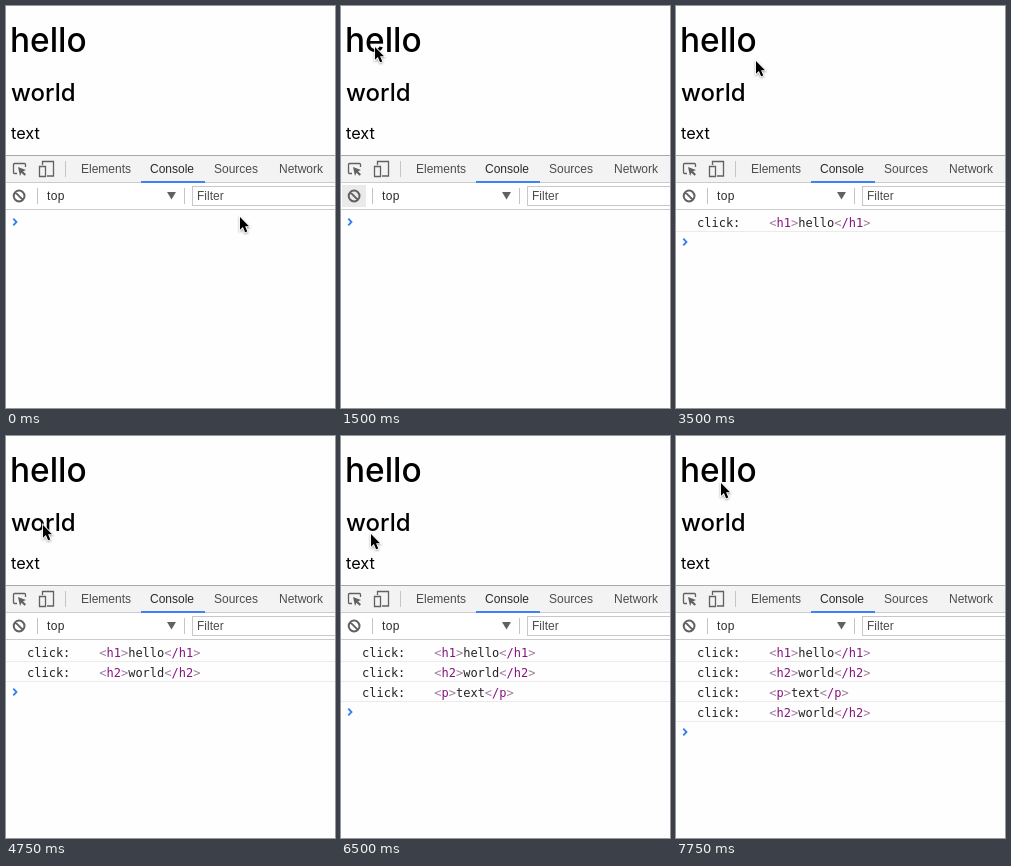
Write an HTML page that moves like this. It is 329 px wide and 402 px high and loops after 8000 ms.

```html
<!DOCTYPE html>
<html lang="en">
<head>
<meta charset="utf-8">
<title>Click logger</title>
<style>
html, body { margin: 0; width: 100%; height: 100%; overflow: hidden; background: #fefefe; }
svg { display: block; }
.page { font-family: Inter, sans-serif; fill: #000; }
.ui { font: 12px "Liberation Sans", Arial, sans-serif; fill: #4c4c4c; }
.ui .dark { fill: #2b2b2b; }
.log { font: 12px "DejaVu Sans Mono", monospace; fill: #222; white-space: pre; }
.bracket { fill: #a07c9c; }
.tag { fill: #881280; }
.icon { fill: none; stroke: #616161; stroke-width: 1.3; }
</style>
</head>
<body>
<svg width="329" height="402" viewBox="0 0 329 402">
  <g class="page">
    <text x="4" y="46" font-size="33.4" font-weight="450">hello</text>
    <text x="5" y="94.5" font-size="24" font-weight="480">world</text>
    <text x="5" y="133" font-size="16.3">text</text>
  </g>

  <rect y="149" width="329" height="28" fill="#f3f3f3"/>
  <rect y="149" width="329" height="1" fill="#a9a9a9"/>
  <rect y="176" width="329" height="1" fill="#ccc"/>
  <rect y="177" width="329" height="26" fill="#fff"/>
  <rect y="203" width="329" height="1" fill="#ccc"/>
  <rect x="135" y="175" width="64" height="2" fill="#3e82f7"/>
  <path d="M59.5 155v16M31.5 182v16M178.5 182v16" stroke="#c4c4c4"/>
  <rect id="hover" x="1" y="179" width="24" height="22" fill="#eaeaea"/>

  <g class="icon">
    <path d="M11 167.5H8.5a1 1 0 0 1-1-1v-8a1 1 0 0 1 1-1h10a1 1 0 0 1 1 1V161"/>
    <path d="M12 161l8 3-3 1.3 3 3-1.5 1.4-3-3L14 170z" fill="#616161" stroke="none"/>
    <path d="M36.5 159v-3.5h11v14.5H41M33.5 160.5h6v10h-6z"/>
    <path d="M9.4 186.4l7.2 7.2M18.5 190a5.4 5.4 0 1 0-10.8 0a5.4 5.4 0 1 0 10.8 0" stroke-width="2"/>
  </g>
  <path d="M161 186h9l-4.5 7.5z" fill="#616161"/>
  <rect x="186.5" y="180.5" width="160" height="19" fill="#fff" stroke="#c8c8c8"/>
  <g class="ui">
    <text x="75" y="167">Elements</text>
    <text x="144" y="167" class="dark">Console</text>
    <text x="208" y="167">Sources</text>
    <text x="273" y="167">Network</text>
    <text x="41" y="194" class="dark" letter-spacing=".4">top</text>
    <text x="191" y="194">Filter</text>
  </g>

  <g id="logs"></g>
  <path id="prompt" d="M7.3 212.7l3.2 3.3-3.2 3.3" fill="none" stroke="#367cf1" stroke-width="1.8"/>
  <path id="cursor" d="M0 0V12.8l2.9-2.7 2.2 5.2 2.2-.9-2.2-5.1H9z"
    stroke="#fff" stroke-width="1.6" paint-order="stroke"
    style="filter:drop-shadow(0 1px 1px rgba(0,0,0,.35))"/>
</svg>
<script>
const LOOP = 8000, ROW = 20;
const $ = id => document.getElementById(id);

// Pointer samples: start time, x, y
const pointer = [
  [0, 234, 211], [250, 199, 75], [750, 97, 74], [1000, 33, 43], [1250, 34, 41],
  [2750, 35, 41], [3500, 80, 55], [3750, 37, 84], [4000, 37, 89], [5000, 37, 94],
  [5250, 25, 134], [5500, 22, 135], [6250, 23, 113], [6500, 30, 98],
  [7250, 37, 87], [7500, 44, 57], [7750, 45, 47]
];
const clicks = [
  [3000, 'h1', 'hello'], [4750, 'h2', 'world'], [5750, 'p', 'text'], [7000, 'h2', 'world']
];

const part = (cls, s) => `<tspan class="${cls}">${s}</tspan>`;
const tag = name => part('bracket', '&lt;') + part('tag', name) + part('bracket', '&gt;');

$('logs').innerHTML = clicks.map(([, name, text], i) => `<g>
  <text class="log" x="21" y="${220.5 + i * ROW}">click:    ${tag(name)}${text}${tag('/' + name)}</text>
  <rect y="${225 + i * ROW}" width="329" height="1" fill="#ebebeb"/></g>`).join('');
const rows = [...$('logs').children];

function draw(now) {
  const t = now % LOOP;
  const [, x, y] = pointer.findLast(p => p[0] <= t);
  const count = clicks.filter(c => c[0] <= t).length;
  rows.forEach((row, i) => row.setAttribute('visibility', i < count ? 'visible' : 'hidden'));
  $('prompt').setAttribute('transform', `translate(0 ${count * ROW})`);
  $('cursor').setAttribute('transform', `translate(${x} ${y})`);
  $('hover').setAttribute('visibility', t >= 1500 && t < 2750 ? 'visible' : 'hidden');
}

const start = performance.now();
function tick() {
  draw(performance.now() - start);
  requestAnimationFrame(tick);
}
tick();
</script>
</body>
</html>
```
